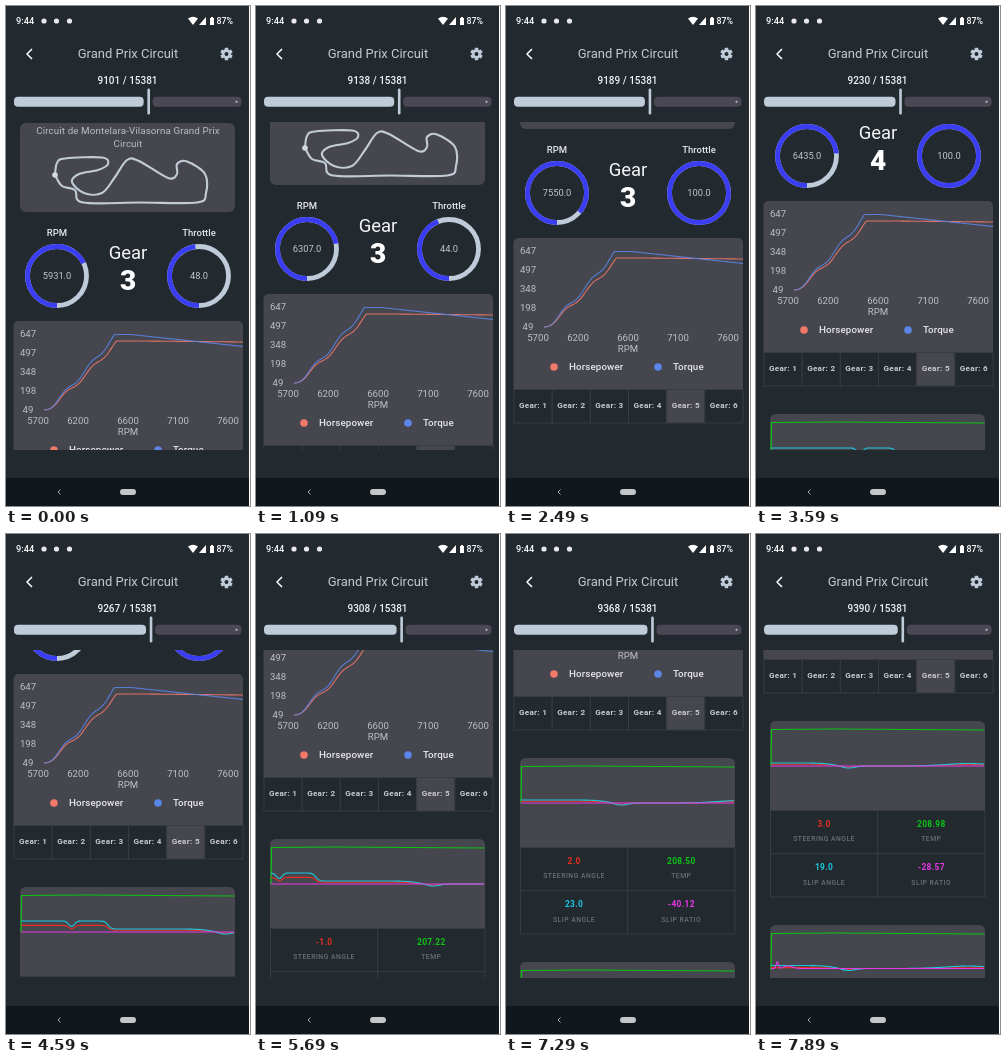
An HTML page that plays this animation: 244 px wide and 500 px high, repeating every 7990 ms.

```html
<!DOCTYPE html>
<html lang="en">
<head>
<meta charset="utf-8">
<title>Grand Prix Circuit</title>
<style>
  html, body { margin: 0; width: 100%; height: 100%; overflow: hidden; background: #22292f; }
  svg { display: block; width: 100vw; height: 100vh; font-family: Roboto, sans-serif; }
</style>
</head>
<body>
<svg id="stage" viewBox="0 0 244 500"></svg>
<script>
const LOOP = 7990, FRAMES = 15381, MAX_RPM = 8750, GEAR_SHIFT = 2990;
const BG = '#22292f', CARD = '#46464e', LINE = '#373c43', PALE = '#bfcbd9', BLUE = '#3b3df2';
const ORANGE = '#f2786a', SKY = '#5b86e8', GREEN = '#0cc414', CYAN = '#1cc8de', MAGENTA = '#e638e6', RED = '#e5301f';

// Key points as [time, value].
const scroll = [[0, 0], [1090, 27], [2490, 83], [3590, 120], [4590, 175], [6690, 267], [7890, 341]];
const throttle = [[0, 48], [1090, 44], [1790, 100]];
const rpmBeforeShift = [[0, 5931], [1090, 6307], [2490, 7550], [2990, 7950]];
const rpmAfterShift = [[2990, 6190], [7890, 8190]];

// Telemetry heights along a strip that moves left with the counter.
const bell = (x, center, width) => Math.exp(-(((x - center) / width) ** 2));
const fall = (x, center, width) => 1 / (1 + Math.exp((x - center) / width));
const slipAngle = u => 8 * fall(u, 102, 1.6) + 3 * fall(u, 203, 6)
  - 5.5 * bell(u, 65.5, 4) - 2.2 * bell(u, 219, 9) + 2.45 * bell(u, 339, 32);
const wheelSlip = u => 7 * bell(u, 148, 1.5) + 2.5 * bell(u, 159, 6);

// Engine curve from 0 to 1: a wavy climb to the plateau.
const climb = u => u < 1 ? Math.max(0, u ** 1.15 - 0.015 + 0.028 * Math.cos(17.5 * (u - 0.3))) : 1;
const powerY = x => 404 - 69 * climb((x - 38) / 73) + Math.max(0, x - 137) / 100;
const torqueY = x => 404 - 75.5 * climb((x - 38) / 71) + Math.max(0, x - 125) * 0.107;

function lerp(points, x) {
  const i = points.findIndex(p => p[0] > x);
  if (i < 0) return points[points.length - 1][1];
  const [x0, y0] = points[i - 1], [x1, y1] = points[i];
  return y0 + (y1 - y0) * (x - x0) / (x1 - x0);
}

function plot(from, to, y) {
  const points = [];
  for (let x = from; x <= to; x++) points.push(`${x} ${y(x).toFixed(2)}`);
  return 'M' + points.join('L');
}

function smooth(points) {
  let d = `M${points[0]}`;
  for (let i = 0; i < points.length - 1; i++) {
    const a = points[i - 1] || points[i], b = points[i], c = points[i + 1], e = points[i + 2] || c;
    d += `C${[0, 1].map(k => b[k] + (c[k] - a[k]) / 6)} ${[0, 1].map(k => c[k] - (e[k] - b[k]) / 6)} ${c}`;
  }
  return d;
}

const rect = (x, y, w, h, fill, more = '') =>
  `<rect x="${x}" y="${y}" width="${w}" height="${h}" fill="${fill}" ${more}/>`;
const circle = (x, y, r, fill, more = '') =>
  `<circle cx="${x}" cy="${y}" r="${r}" fill="${fill}" ${more}/>`;
const stroke = (d, color, width = 1, more = '') =>
  `<path d="${d}" fill="none" stroke="${color}" stroke-width="${width}" stroke-linejoin="round" ${more}/>`;
const shape = (d, fill) => `<path d="${d}" fill="${fill}"/>`;

// y is the vertical centre of the capitals.
function text(x, y, size, content, { fill = '#e4e5e8', anchor = 'middle', weight = 400, gap = 0, id = '' } = {}) {
  return `<text x="${x}" y="${y + size * 0.356}" font-size="${size}" font-weight="${weight}" fill="${fill}"
    text-anchor="${anchor}" letter-spacing="${gap}" id="${id}">${content}</text>`;
}

function statusBar() {
  const style = { fill: '#fff', anchor: 'start', weight: 500 };
  return text(10, 15, 9.2, '9:44', style)
    + [38, 50.5, 63.5].map(x => circle(x, 15, 2.6, '#e8e8ea')).join('')
    + shape('M182 12.5Q187 9 192 12.5L187 19Z', '#fff') + shape('M193 19L200 11V19Z', '#fff')
    + shape('M204 12H205V11H207V12H208V19H204Z', '#fff')
    + text(210.5, 15, 8.8, '87%', style);
}

function header() {
  let teeth = '';
  for (let a = 0; a < 360; a += 60) teeth += rect(-1.8, -6.2, 3.6, 4, PALE, `rx=".6" transform="rotate(${a})"`);
  return stroke('M26 43L21 48L26 53', '#fff', 1.5)
    + text(122, 47.7, 13, 'Grand Prix Circuit', { fill: '#c6cad0' })
    + `<g transform="translate(220.5 48)">${teeth}${circle(0, 0, 3.4, 'none', `stroke="${PALE}" stroke-width="2.6"`)}</g>`
    + text(121.5, 74.7, 10, '', { id: 'count', fill: '#f1f1f3', weight: 500 })
    + rect(8, 90.7, 130, 10, PALE, 'rx="4" id="played"')
    + rect(147, 90.7, 88.5, 10, '#4c4755', 'rx="4" id="remaining"')
    + circle(230.5, 95.7, 1, PALE) + rect(141, 82.5, 2.6, 26, PALE, 'rx="1.3" id="thumb"');
}

function trackCard() {
  const track = [[49, 169], [51, 157], [59, 152.5], [96, 151.5], [102, 158], [92, 164], [73, 168], [66, 176],
    [78, 187], [96, 187], [109, 171], [121, 154], [133, 155], [162, 172], [171, 168], [171, 158], [181, 155.5],
    [199, 168], [200, 187], [191, 196.5], [134, 196.5], [77, 196.5], [69, 184], [56, 180], [49, 169]];
  const style = { fill: '#bcbcc3', gap: 0.1 };
  return rect(14, 117, 215, 89, CARD, 'rx="6"')
    + text(122, 124.5, 9.8, 'Circuit de Montelara-Vilasorna Grand Prix', style)
    + text(122, 138, 9.8, 'Circuit', style)
    + stroke(smooth(track), '#c2ccd4', 2.1) + circle(49, 169, 2.8, '#d3dbe2');
}

function gauge(x, label, id) {
  const ring = 'M0 29.5A29.5 29.5 0 0 1 0 -29.5A29.5 29.5 0 0 1 0 29.5';
  return text(x, 226.7, 9.5, label, { weight: 500 })
    + `<g transform="translate(${x} 270)">${stroke(ring, PALE, 4.8)}`
    + stroke(ring, BLUE, 4.8, `pathLength="100" id="${id}Ring"`)
    + text(0, 0, 9.3, '', { id, fill: '#c4c7cc' }) + '</g>';
}

function powerCard() {
  const axis = { fill: '#bfc0c6' };
  let out = rect(7.5, 315, 229.5, 156, CARD, 'rx="5"');
  [647, 497, 348, 198, 49].forEach((n, i) => out += text(22, 328 + 19 * i, 9.6, n, axis));
  [5700, 6200, 6600, 7100, 7600].forEach((n, i) => out += text(i ? 22 + 50 * i : 32, 414.5, 9.6, n, axis));
  out += text(122, 426, 9.6, 'RPM', axis)
    + stroke(plot(38, 237, powerY), ORANGE, 1.1, 'opacity=".88"')
    + stroke(plot(38, 237, torqueY), SKY, 1.1, 'opacity=".88"');
  [[48, ORANGE, 'Horsepower'], [152, SKY, 'Torque']].forEach(([x, color, name]) =>
    out += circle(x, 444, 3.8, color) + text(x + 15, 444, 9.8, name, { anchor: 'start', weight: 500, gap: 0.1 }));
  const width = 229 / 6;
  for (let i = 0; i < 6; i++) {
    out += rect(8 + i * width, 466.5, width, 33.5, i === 4 ? CARD : BG, `stroke="${LINE}"`)
      + text(8 + (i + 0.5) * width, 482.5, 8.1, `Gear: ${i + 1}`, { weight: 700, gap: 0.3, fill: '#c9cacd' });
  }
  return out;
}

function telemetryCard(n) {
  const cells = [['steering', 'STEERING ANGLE', RED], ['temp', 'TEMP', GREEN],
    ['slip', 'SLIP ANGLE', CYAN], ['ratio', 'SLIP RATIO', MAGENTA]];
  const top = 528 + n * 204;
  let out = shape(`M14 ${top + 89}V${top + 6}q0 -6 6 -6H223q6 0 6 6V${top + 89}Z`, CARD)
    + stroke(`M15 ${top + 45}L15.5 ${top + 8.5}L80 ${top + 8}L228.5 ${top + 9}`, GREEN, 1.2);
  [['red', RED], ['cyan', CYAN], ['magenta', MAGENTA]].forEach(([name, color]) =>
    out += stroke('', color, 1.1, `id="${name}${n}"`));
  cells.forEach(([id, label, color], i) => {
    const x = 14.5 + (i % 2) * 107.2, y = top + 89.5 + (i >> 1) * 43.2;
    out += rect(x, y, 107.2, 43.2, BG, `stroke="${LINE}"`)
      + text(x + 53.6, y + 13.5, 8.4, '', { id: id + n, fill: color, weight: 700, gap: 0.35 })
      + text(x + 53.6, y + 28.5, 6.8, label, { fill: '#6b7077', weight: 500, gap: 0.5 });
  });
  return out;
}

document.getElementById('stage').innerHTML =
  `<clipPath id="view">${rect(0, 116, 244, 328, '#fff')}</clipPath>`
  + rect(0, 0, 244, 500, BG) + statusBar() + header()
  + '<g clip-path="url(#view)"><g id="content">'
  + trackCard() + gauge(51, 'RPM', 'rpm') + gauge(193, 'Throttle', 'throttle')
  + text(122, 246, 18.5, 'Gear', { fill: '#f4f4f6' })
  + text(122, 274, 28, '', { id: 'gear', fill: '#fff', weight: 800 })
  + powerCard() + telemetryCard(0) + telemetryCard(1) + '</g></g>'
  + rect(0, 472, 244, 28, '#10181d') + stroke('M54.5 483.5L52 486L54.5 488.5', '#a8a8a8')
  + rect(114, 483, 16, 6, '#c4c6c8', 'rx="3"') + rect(243, 0, 1, 500, '#fff');

const $ = id => document.getElementById(id);
const setText = (id, value) => { $(id).textContent = value; };
const setNumber = (id, value, digits = 1) => setText(id, value.toFixed(digits));

function draw(t) {
  $('content').setAttribute('transform', `translate(0 ${-Math.round(lerp(scroll, t))})`);

  const count = Math.floor(9101 + 0.0371 * Math.max(0, t - 92)), thumb = 13.7 + 218 * count / FRAMES;
  setText('count', `${count} / ${FRAMES}`);
  $('thumb').setAttribute('x', thumb - 1.3);
  $('played').setAttribute('width', thumb - 13);
  $('remaining').setAttribute('x', thumb + 4);
  $('remaining').setAttribute('width', 231.5 - thumb);

  const shifted = t >= GEAR_SHIFT;
  setText('gear', shifted ? 4 : 3);
  const rpm = lerp(shifted ? rpmAfterShift : rpmBeforeShift, t);
  [['rpm', rpm, MAX_RPM], ['throttle', lerp(throttle, t), 100]].forEach(([id, value, max]) => {
    setNumber(id, Math.round(value));
    $(id + 'Ring').setAttribute('stroke-dasharray', `${100 * value / max} 200`);
  });

  const shift = 1.03 * (count - 9267), sinceReading = t - 6690;
  for (const n of [0, 1]) {
    const base = 573 + n * 202.5;
    const trace = (name, height) => $(name + n).setAttribute('d', plot(15, 228, x => base - height(x + shift)));
    trace('red', u => slipAngle(u) * (n ? 0.3 : 0.6));
    trace('cyan', slipAngle);
    trace('magenta', u => n * wheelSlip(u));
    setNumber('steering' + n, Math.round(1 + sinceReading / 600));
    setNumber('temp' + n, 208.02 + 0.0008 * sinceReading, 2);
    setNumber('slip' + n, Math.round(10 * slipAngle(228 + shift)));
    setNumber('ratio' + n, -51.68 + 0.01926 * sinceReading, 2);
  }
}

// The screen refreshes ten times a second.
function tick() {
  const t = performance.now() % LOOP;
  draw(t < 890 ? Math.floor(t / 100) * 100 : Math.floor((t + 10) / 100) * 100 - 10);
  requestAnimationFrame(tick);
}
tick();
</script>
</body>
</html>
```
